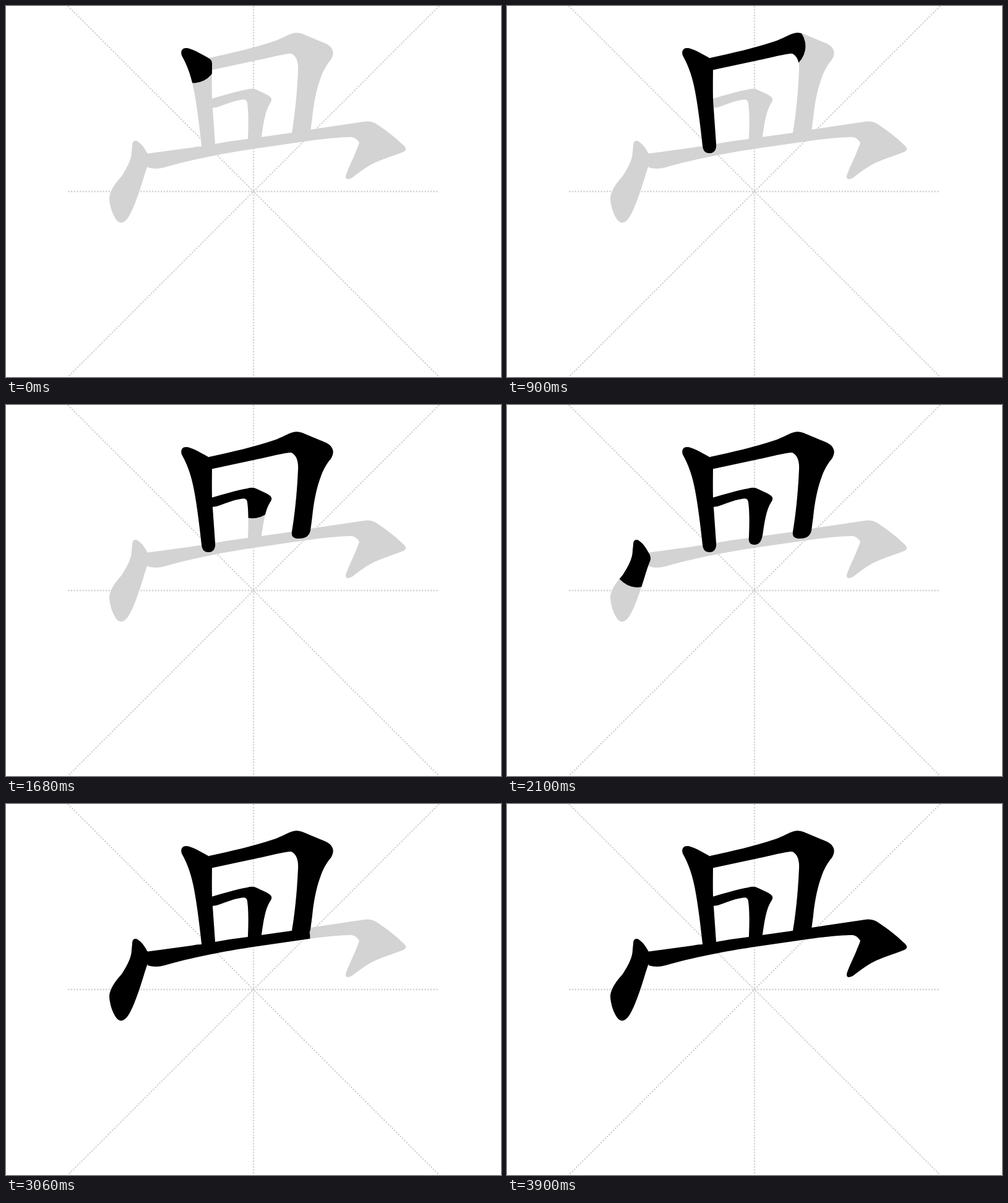
These frames come from a looping animation (800 px wide and 600 px high, 3.96 s). An HTML page:

```html
<!DOCTYPE html>
<html lang="en">
<head>
<meta charset="utf-8">
<title>Stroke order</title>
<style>
  html, body { margin: 0; width: 100%; height: 100%; overflow: hidden; background: #fff; }
  svg { display: block; width: 800px; height: 600px; }
  #grid { fill: none; stroke: lightgray; stroke-width: 1; stroke-dasharray: 1 1; }
  #base { fill: lightgray; }
  #ink { fill: none; stroke: #000; stroke-linecap: round; stroke-linejoin: round; }
</style>
</head>
<body>
<svg viewBox="0 0 800 600">
  <defs id="defs"></defs>
  <g id="grid" transform="translate(100) scale(2.34375)">
    <path d="M0 0L256 256"/>
    <path d="M256 0L0 256"/>
    <path d="M128 0V256"/>
    <path d="M0 128H256"/>
  </g>
  <g id="base"></g>
  <g id="ink"></g>
</svg>
<script>
const LOOP = 3960, STEP = 60;
const BRUSH = 75, FULL = 600;

// start in ms, speed in px per ms; the brush follows `spine` inside `outline`
const strokes = [
  {
    start: 0, speed: 0.179,
    spine: 'M303 87L312 105L317 130L323 170L327 234',
    outline: 'M284 80C282 74 284 68 291 68C299 68 313 76 327 84Q333 87 333 93C333 120 332 145 334 166' +
      'L338 223C339 232 335 238 327 238C320 238 317 234 316 226C313 199 309 164 304 138C300 116 294 98 284 80Z'
  },
  {
    start: 440, speed: 0.245,
    spine: 'M335 90L440 66L470 60L498 76L490 110L488 121L477 208',
    outline: 'M328 84C365 76 400 68 433 57C445 53 456 46 464 44Q471 42 479 45L515 60C529 66 532 76 525 87' +
      'C506 108 498 150 495 180L492 203C490 212 484 216 473 216C464 216 461 212 462 205' +
      'C468 170 471 130 472 104C473 89 468 80 461 77C450 77 420 85 400 89L330 104Z'
  },
  {
    start: 1290, speed: 0.17,
    spine: 'M335 157L395 143L410 154L402 221',
    outline: 'M332 150C353 144 372 138 390 135Q399 132 406 136L421 143C430 148 431 151 427 157' +
      'C419 169 416 190 413 211C411 221 407 226 400 226C392 226 390 221 391 213' +
      'C392 192 392 172 390 157Q389 149 379 152C365 154 350 161 340 164L332 165Z'
  },
  {
    start: 1900, speed: 0.165,
    spine: 'M209 226L215 242L211 257L186 346',
    outline: 'M204 226C204 218 209 216 214 220C221 225 225 232 229 239Q234 246 231 253' +
      'C225 267 220 288 214 304C208 321 202 336 196 344C189 353 182 352 177 344' +
      'C171 335 167 320 167 310C168 298 178 285 187 275C196 261 203 248 203 236Z'
  },
  {
    start: 2287, speed: 0.287,
    spine: 'M235 251L318 236L454 215L545 202L588 202L606 220L555 277',
    outline: 'M226 239L300 229Q308 227 317 227L338 223Q365 218 391 215L462 205L492 200L579 187' +
      'Q591 185 602 193C615 202 630 213 641 224Q651 232 642 236C622 244 606 248 589 257' +
      'C577 264 568 271 559 278Q549 283 549 276C550 268 561 248 566 234Q570 225 571 221' +
      'Q566 213 559 212C542 212 510 215 490 218L400 231C360 237 300 248 256 261Q242 265 229 261Z'
  }
];

const byId = id => document.getElementById(id);

function add(parent, tag, attrs) {
  const node = document.createElementNS('http://www.w3.org/2000/svg', tag);
  for (const key in attrs) node.setAttribute(key, attrs[key]);
  return parent.appendChild(node);
}

strokes.forEach((stroke, i) => {
  const clip = add(byId('defs'), 'clipPath', { id: 'clip' + i });
  add(clip, 'path', { d: stroke.outline });
  add(byId('base'), 'path', { d: stroke.outline });
  stroke.brush = add(byId('ink'), 'path', { d: stroke.spine, 'clip-path': `url(#clip${i})` });
  stroke.length = stroke.brush.getTotalLength();
});

function draw(time) {
  for (const { brush, start, speed, length } of strokes) {
    const drawn = (time - start) * speed;
    brush.style.display = drawn < 0 ? 'none' : '';
    brush.style.strokeWidth = drawn < length ? BRUSH : FULL;
    brush.style.strokeDasharray = drawn < length ? `${Math.max(drawn, 0.01)} ${2 * length}` : 'none';
  }
}

let origin;
function tick(now) {
  origin ??= now;
  const time = (now - origin) % LOOP;
  draw(Math.floor(time / STEP) * STEP);
  requestAnimationFrame(tick);
}

draw(0);
requestAnimationFrame(tick);
</script>
</body>
</html>
```
